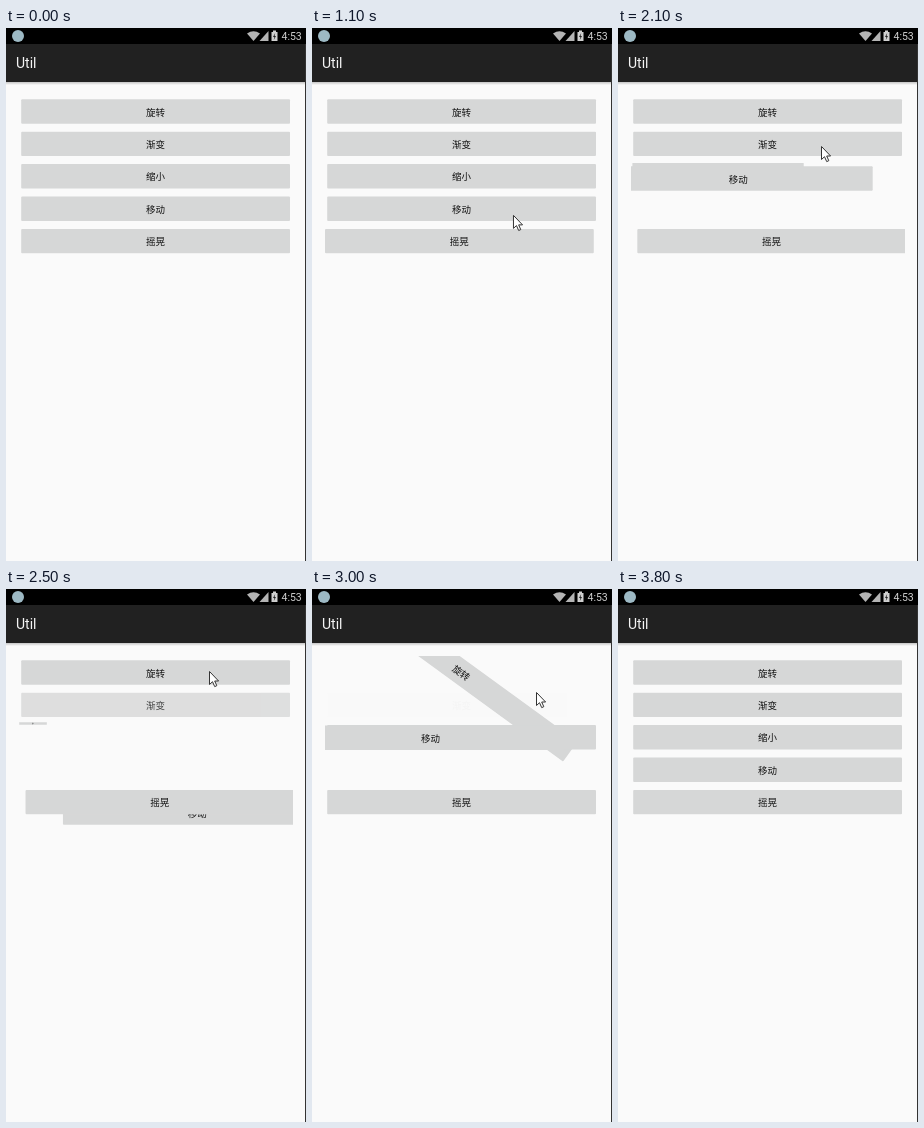
Animation, 300 px wide and 533 px high, one loop 4.6 s. Source, as an HTML page:

```html
<!DOCTYPE html>
<html lang="zh">
<head>
<meta charset="utf-8">
<title>Util</title>
<style>
html, body { margin: 0; width: 100%; height: 100%; overflow: hidden; background: #fafafa; }
svg { display: block; font-family: Roboto, sans-serif; }
#list {
  font: 500 9.5px "Noto Sans CJK SC", "Noto Sans CJK", "Noto Sans SC", sans-serif;
  text-anchor: middle;
}
</style>
</head>
<body>
<svg width="300" height="533">
  <defs>
    <linearGradient id="shade" x2="0" y2="1">
      <stop stop-color="#c4c4c4"/><stop offset="1" stop-color="#fafafa"/>
    </linearGradient>
    <clipPath id="frame"><rect x="13" y="67" width="274" height="466"/></clipPath>
  </defs>
  <rect width="300" height="533" fill="#fafafa"/>
  <rect y="54" width="300" height="3" fill="url(#shade)"/>
  <rect width="300" height="16"/>
  <rect y="16" width="300" height="38" fill="#212121"/>
  <rect x="299" y="16" width="1" height="517" fill="#333"/>
  <circle cx="12" cy="8" r="6" fill="#9db9c4"/>
  <g fill="#b4b4b4">
    <path d="M241 5.5Q247.5 0.8 254 5.5L247.5 13Z"/>
    <path d="M253.5 13H262.5V3Z"/>
  </g>
  <g fill="#d0d0d0">
    <path d="M265.5 4H267V2.5H270V4H271.5V13H265.5Z"/>
    <path d="M269.2 5L267 9H268.4L267.8 12L270 8H268.6Z" fill="#222"/>
    <text x="275.5" y="12" font-size="10.5">4:53</text>
  </g>
  <text x="10" y="40.4" font-size="14" fill="#f4f4f4">Util</text>
  <g id="list" clip-path="url(#frame)"></g>
  <path id="cursor" d="M.5 .5V13.5L3.5 10.7L5.7 15.6L7.8 14.7L5.7 10H9.6Z" fill="#fff" stroke="#333"/>
</svg>
<script>
const LOOP = 4600, STEP = 100, FIRST = 300, LAST = 3800;
const TOP = 71.3, PITCH = 32.4;
const list = document.getElementById('list');
const cursor = document.getElementById('cursor');

function add(parent, tag, attrs) {
  const el = document.createElementNS('http://www.w3.org/2000/svg', tag);
  for (const key in attrs) el.setAttribute(key, attrs[key]);
  return parent.appendChild(el);
}

const [spin, fade, shrink, move, shake] = ['旋转', '渐变', '缩小', '移动', '摇晃'].map((label, i) => {
  const g = add(list, 'g'), y = TOP + PITCH * i;
  add(g, 'rect', { x: 15.2, y, width: 268.8, height: 24.4, rx: 1, fill: '#d6d7d7' });
  add(g, 'text', { x: 149.5, y: y + 16.3, fill: '#141414' }).textContent = label;
  return g;
});

const clamp = p => Math.max(0, Math.min(1, p));
const smooth = p => (1 - Math.cos(Math.PI * clamp(p))) / 2;
const mix = (a, b, p) => a + (b - a) * p;
const place = (el, value) => el.setAttribute('transform', value);

// Eased progress from 0 to 1, back at 0 once the run is over
const run = (t, start, length) =>
  t > start && t < start + length ? smooth((t - start) / length) : 0;

// Moments at which the sliding button reverses
const TURNS = [1310, 1650, 2060, 2470, 3010];

function slide(t) {
  const i = TURNS.findIndex(turn => t <= turn);
  if (i < 1) return [0, 0];
  const p = smooth((t - TURNS[i - 1]) / (TURNS[i] - TURNS[i - 1]));
  const q = i % 2 ? p : 1 - p;
  return [mix(-31, 42.3, q), mix(-32, 43.5, q)];
}

// The pointer reaches a new spot at a steady beat, then speeds off to the right
const SPOTS = [[225, 141], [200, 207], [201, 186], [203, 144], [203, 118], [203, 82]];

function pointer(t) {
  const beat = (t - 270) / 430;
  const i = Math.min(SPOTS.length - 2, Math.floor(beat));
  const p = smooth((beat - i - 0.47) / 0.53);
  const [x, y] = SPOTS[i].map((v, j) => mix(v, SPOTS[i + 1][j], p));
  const away = Math.max(0, t - 2700) / 300;
  return [x + 21 * away ** 2, y + 21 * away];
}

function pose(t) {
  place(spin, `rotate(${360 * run(t, 2795, 1000)} 149.6 83.5)`);
  fade.setAttribute('opacity', 1 - run(t, 2237, 840));
  place(shrink, `translate(13 133) scale(${1 - run(t, 1668, 1050)}) translate(-13 -133)`);
  place(move, `translate(${slide(t)})`);

  const cycles = (t - 977) / 211.3;
  const sway = cycles > 0 && cycles < 8 ? 4.5 * Math.sin(2 * Math.PI * cycles) : 0;
  place(shake, `translate(${sway})`);

  const visible = t >= FIRST && t < 3400;
  cursor.setAttribute('visibility', visible ? 'visible' : 'hidden');
  if (visible) place(cursor, `translate(${pointer(t)})`);
}

function tick() {
  const t = performance.now() % LOOP;
  pose(t < FIRST ? 0 : Math.min(LAST, Math.floor(t / STEP) * STEP));
  requestAnimationFrame(tick);
}
tick();
</script>
</body>
</html>
```
